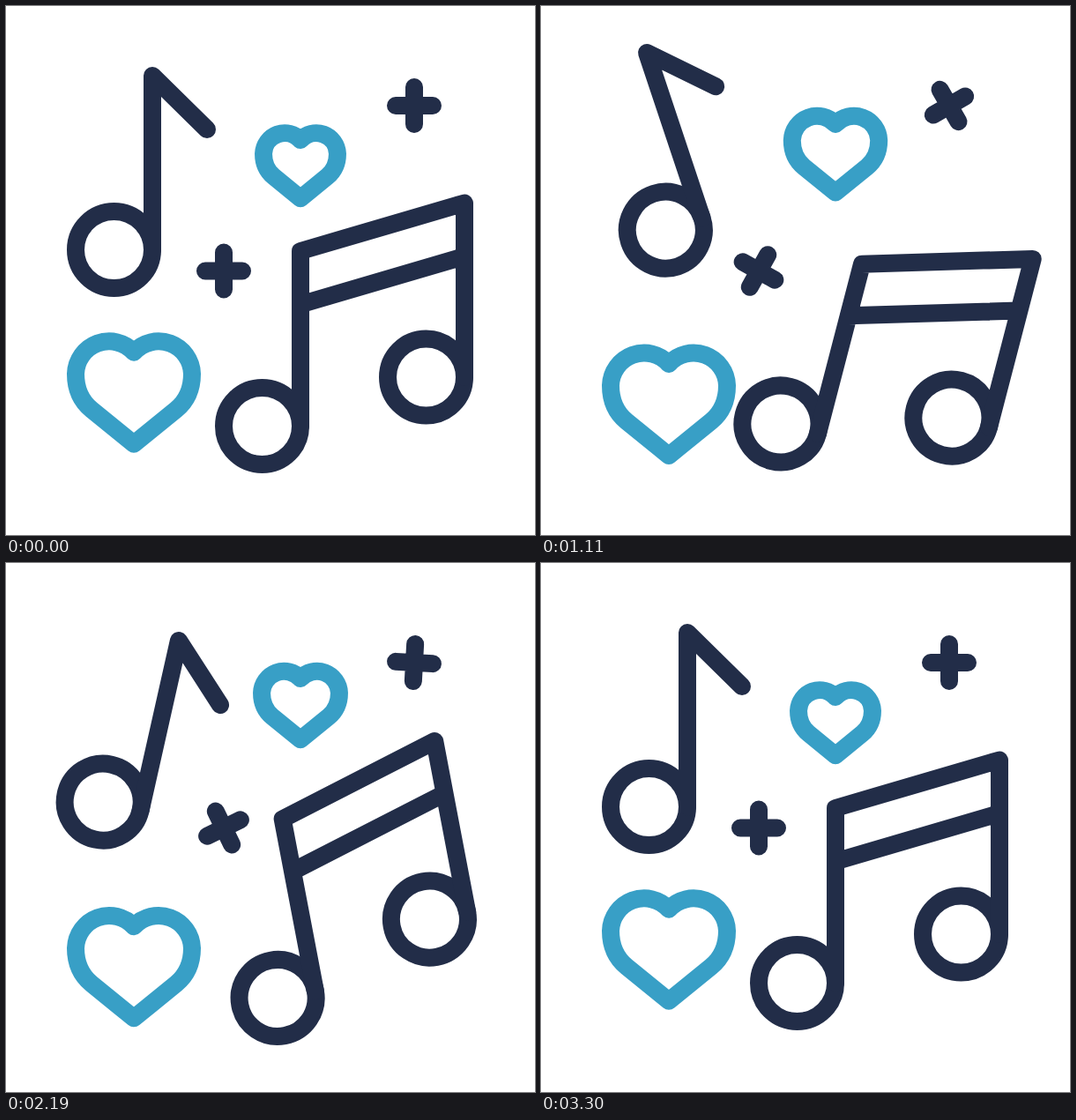
Write an HTML page that moves like this. It is 600 px wide and 600 px high and loops after 3600 ms.

```html
<!DOCTYPE html>
<html lang="en">
<head>
<meta charset="utf-8">
<title>Music and hearts</title>
<style>
  html, body { margin: 0; width: 100%; height: 100%; overflow: hidden; background: #fff; }
  svg { display: block; width: 600px; height: 600px; }
  path, circle {
    fill: none; stroke: #222d48; stroke-width: 20;
    stroke-linecap: round; stroke-linejoin: round;
    vector-effect: non-scaling-stroke;
  }
  .heart { stroke: #389fc6; }
</style>
</head>
<body>
<svg viewBox="0 0 600 600">
  <defs>
    <path id="heart" class="heart" d="M0-44A38 38 0 0 0-66-19.5C-66-2-59 12-48 21L0 60L48 21C59 12 66-2 66-19.5A38 38 0 0 0 0-44Z"/>
    <path id="plus" d="M-21 0H21M0-21V21"/>
  </defs>
  <g id="single">
    <circle cx="122.5" cy="276.5" r="43.5"/>
    <path d="M166 276.5V79L228 140"/>
  </g>
  <g id="pair">
    <circle cx="290.5" cy="476.5" r="43.5"/>
    <circle cx="476.5" cy="421" r="43.5"/>
    <path d="M334 476.5V278L520 223.5V421M334 338.5L520 284"/>
  </g>
  <use id="bigHeart" href="#heart"/>
  <use id="smallHeart" href="#heart"/>
  <use id="leftPlus" href="#plus"/>
  <use id="rightPlus" href="#plus"/>
</svg>
<script>
const LOOP = 3600, STEP = 30, START = 300, END = 3300;
const EVEN = [300, 1050, 1800, 2550, 3300];
const SWING = [300, 1200, 2100, 2700, 3300];
const HALVES = [300, 1800, 3300];

const smooth = u => u * u * (3 - 2 * u);

// Eased value at time t between keyframes
function ease(t, times, values) {
  let i = 1;
  while (i < times.length - 1 && t > times[i]) i++;
  const u = (t - times[i - 1]) / (times[i] - times[i - 1]);
  return values[i - 1] + (values[i] - values[i - 1]) * smooth(u);
}

// Sum of beats, each 300 ms up and 300 ms down
const beats = (t, peaks) =>
  peaks.reduce((sum, p) => sum + smooth(Math.max(0, 1 - Math.abs(t - p) / 300)), 0);

const place = (id, transform) =>
  document.getElementById(id).setAttribute("transform", transform);

function draw(now) {
  const time = now % LOOP;
  const t = Math.min(END, Math.max(START, time - time % STEP));
  const bob = ease(t, EVEN, [0, 24, -24, 24, 0]);
  const drift = ease(t, HALVES, [0, 23.6, 0]);
  const swing = (...angles) => ease(t, SWING, [0, ...angles, 0]);

  place("single", `translate(0 ${-bob}) rotate(${swing(-19, 14, -8)} 134.3 219)`);
  place("pair", `translate(0 ${bob}) rotate(${swing(15, -12, 8)} 381.5 391)`);

  const big = 1 - 0.187 * beats(t, [600, 1800, 3000]);
  const small = 0.636 * (1 + 0.22 * beats(t, [600, 1200, 2400, 3000]));
  place("bigHeart", `translate(145 ${436.7 + drift}) scale(${big})`);
  place("smallHeart", `translate(334 ${180 - drift}) scale(${small})`);

  place("leftPlus", `translate(247 300.5) rotate(${swing(30, -28.5, 15)})`);
  place("rightPlus", `translate(463 113) rotate(${ease(t, EVEN, [0, -31, 23.5, -15, 0])})`);
}

const begin = performance.now();
function tick() {
  draw(performance.now() - begin);
  requestAnimationFrame(tick);
}
tick();
</script>
</body>
</html>
```
